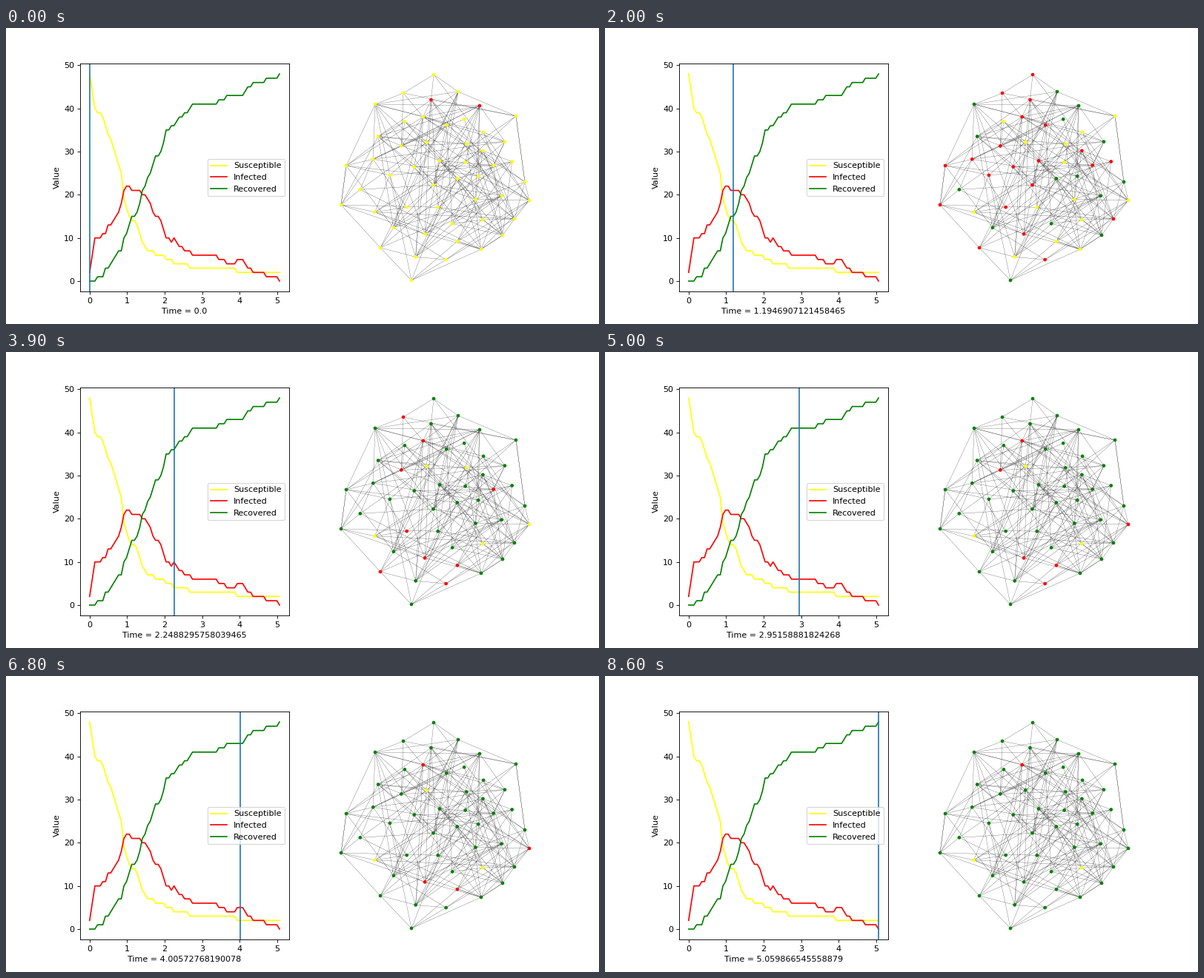
A matplotlib script that plays this animation: 800 px wide and 400 px high, repeating every 8.8 s.

```python
import math

import matplotlib.pyplot as plt
import numpy as np
from matplotlib.animation import FuncAnimation
from matplotlib.collections import LineCollection

FRAMES, INTERVAL = 88, 100
END_TIME, SAMPLES = 5.059866545558879, 73
NODES, LINKS = 50, 200
NETWORK_SPEED = 0.785  # samples per frame, slightly slower than the chart

rng = np.random.default_rng(7)


def stepped_curve(*points):
    """Whole-number curve through a few (sample, value) points."""
    curve = np.interp(np.arange(SAMPLES), *zip(*points))
    return np.round(curve).astype(int)


def scatter_nodes(fixed):
    """Fill an ellipse evenly, each new node far from all earlier ones."""
    points = list(fixed)
    while len(points) < NODES:
        angle = rng.uniform(0, 2 * np.pi, 60)
        radius = np.sqrt(rng.random(60))
        trial = np.c_[580 + 112 * radius * np.cos(angle),
                      205 + 112 * radius * np.sin(angle)]
        gaps = np.linalg.norm(trial[:, None] - np.array(points), axis=2)
        points.append(tuple(trial[gaps.min(axis=1).argmax()]))
    return np.array(points)


def link_nodes(rim):
    """Links around the rim plus random ones that favour near nodes."""
    a, b = np.triu_indices(NODES, 1)
    dist = np.linalg.norm(nodes[a] - nodes[b], axis=1)
    weight = np.exp(-(dist / 170) ** 2)
    picked = rng.choice(len(a), LINKS - len(rim), False, weight / weight.sum())
    return list(zip(rim, rim[1:] + rim[:1])) + list(zip(a[picked], b[picked]))


def replay_epidemic():
    """Node colours at each sample, in step with the curves."""
    colors = np.full(NODES, "yellow", dtype=object)
    colors[seeds] = "red"
    history = []
    for s, r in zip(susceptible, recovered):
        for before, after, left in [("yellow", "red", s), ("red", "green", NODES - s - r)]:
            pool = np.flatnonzero(colors == before)
            colors[rng.choice(pool, len(pool) - left, replace=False)] = after
        history.append(list(colors))
    return history


times = np.linspace(0, END_TIME, SAMPLES)
susceptible = stepped_curve(
    (0, 48), (2, 40), (5, 38), (9, 31), (12, 25), (13, 19), (15, 15), (18, 13),
    (20, 9), (22, 7.3), (31, 4.6), (37, 3.55), (57, 2.4), (72, 2))
recovered = stepped_curve(
    (0, -0.3), (5, 1.4), (6, 2.6), (12, 7.4), (13, 9.6), (16, 15), (18, 15.9),
    (20, 20.6), (25, 28.6), (27, 30.3), (29, 34.6), (39, 40.55), (48, 41.45),
    (52, 42.6), (58, 43.4), (60, 44.6), (62, 45.6), (72, 47.6))
infected = NODES - susceptible - recovered

seeds = [0, 1]
seed_points = [(573.5, 97), (639, 105)]
rim_points = [(577, 63), (610, 86), (688, 119), (700, 208), (706, 233),
              (686, 258), (670, 280), (641, 299), (547, 341), (505, 297),
              (452, 239), (459, 186), (498, 103), (536, 88)]
nodes = scatter_nodes(seed_points + rim_points)
links = link_nodes(list(range(2, 2 + len(rim_points))))
history = replay_epidemic()

fig, (chart, spare) = plt.subplots(1, 2, figsize=(10, 5), dpi=80)
spare.remove()
for values, color, label in [(susceptible, "yellow", "Susceptible"),
                             (infected, "red", "Infected"),
                             (recovered, "green", "Recovered")]:
    chart.plot(times, values, color=color, label=label)
chart.set_ylabel("Value")
chart.legend(loc="center right")
marker = chart.axvline(0)

net = fig.add_axes([0, 0, 1, 1])
net.set(xlim=(0, 800), ylim=(400, 0))
net.axis("off")
net.add_collection(LineCollection([nodes[[a, b]] for a, b in links],
                                  colors="black", linewidths=0.2))
dots = net.scatter(*nodes.T, s=10, linewidths=1, zorder=3)


def update(frame):
    # Chart samples last 1.2 frames each
    now = float(times[math.ceil((10 * frame - 6) / 12)])
    marker.set_xdata([now, now])
    chart.set_xlabel(f"Time = {now}")
    dots.set_color(history[round(frame * NETWORK_SPEED)])
    return marker, dots


anim = FuncAnimation(fig, update, frames=FRAMES, interval=INTERVAL,
                     init_func=lambda: update(0), repeat=True, repeat_delay=0)
plt.show()
```
